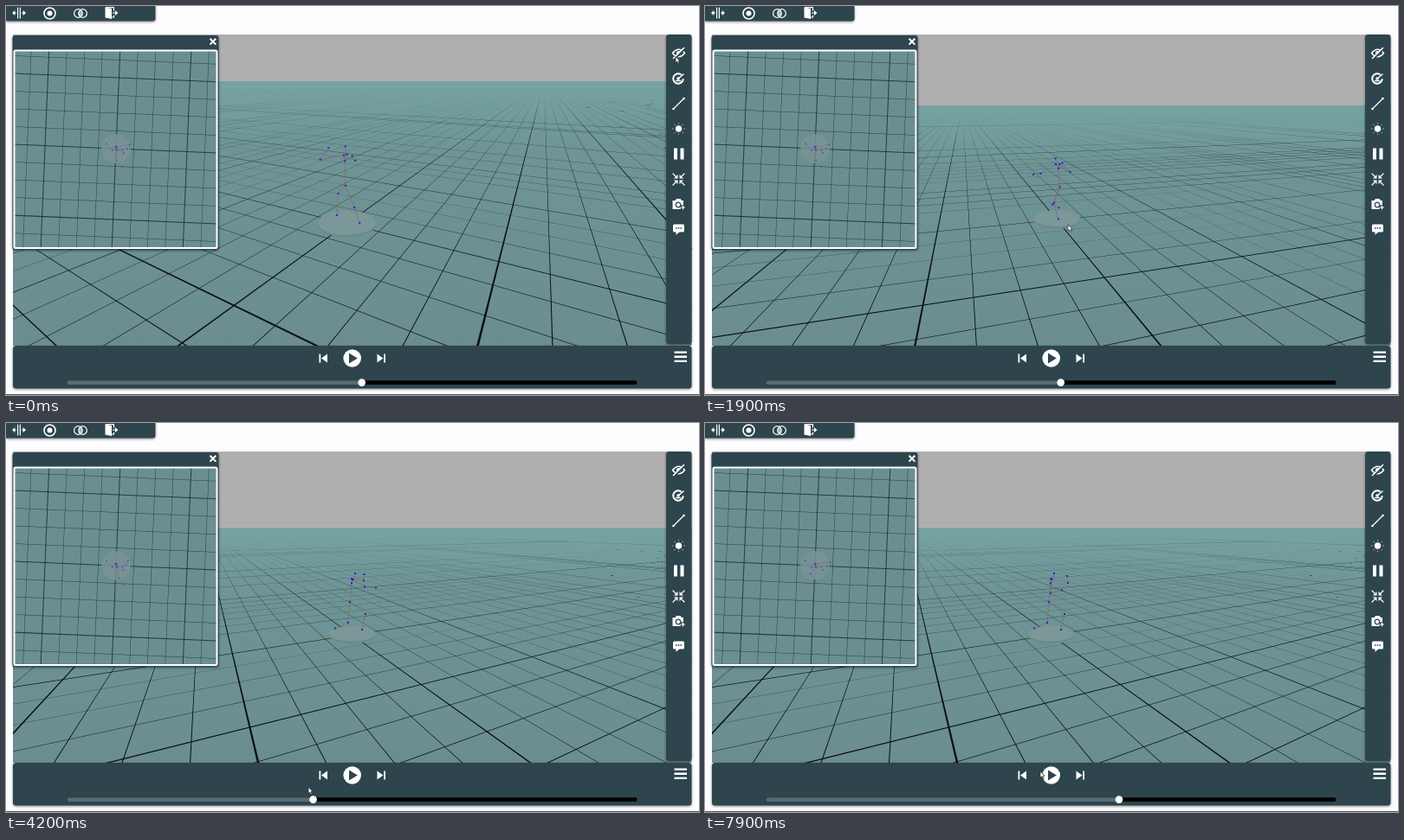
Animation, 800 px wide and 450 px high, one loop 8 s. Source, as an HTML page with a canvas:

```html
<!DOCTYPE html>
<html lang="en">
<head>
<meta charset="utf-8">
<title>Motion viewer</title>
<style>
  html, body { margin: 0; width: 100%; height: 100%; overflow: hidden; background: #fdfcfe; }
  canvas, svg { position: absolute; left: 0; top: 0; width: 800px; height: 450px; display: block; }
  .panel { fill: #2e454d; filter: drop-shadow(0 1px 1.5px rgba(0, 0, 0, .45)); }
  .line { fill: none; stroke: #fff; stroke-width: 1.6; stroke-linecap: round; stroke-linejoin: round; }
  .fine { stroke-width: 1.2; }
  .solid { fill: #fff; }
</style>
</head>
<body>
<canvas id="scene" width="800" height="450"></canvas>
<svg viewBox="0 0 800 450">
  <path class="panel" d="M0 0H172.500V14.500a3 3 0 0 1-3 3H0Z"/>
  <rect class="panel" x="762" y="33" width="29.500" height="358" rx="3.500"/>
  <rect class="panel" x="8" y="393" width="783.500" height="49.500" rx="3.500"/>
  <rect x="0" y="449" width="800" height="1" fill="#55555a"/>

  <!-- top toolbar -->
  <g transform="translate(15 8)">
    <path class="line fine" d="M-1.400-6V6M1.400-6V6M-3.500 0H-6M3.500 0H6"/>
    <path class="solid" d="M-8 0l3.300-3v6zM8 0l-3.300-3v6z"/>
  </g>
  <g transform="translate(50.500 8.500)"><circle class="line" r="6.500"/><circle class="solid" r="3"/></g>
  <g transform="translate(86 8.500)">
    <circle class="line fine" cx="-2.600" r="4.800"/>
    <circle class="line fine" cx="2.600" r="4.800"/>
    <path class="solid" d="M0-4a4.800 4.800 0 0 1 0 8a4.800 4.800 0 0 1 0-8" opacity=".6"/>
  </g>
  <g transform="translate(121 8)">
    <path class="solid" d="M-6.500-6.500L1-5V7L-6.500 5.500Z"/>
    <path class="line fine" d="M-5.500-6.300H3.500V-3M3.500 3V5H1M2.500 0H6"/>
    <path class="solid" d="M8.500 0L5-3v6z"/>
  </g>

  <!-- right toolbar -->
  <g transform="translate(776.500 54.500)">
    <path class="line" d="M-7 0Q0-8.500 7 0Q0 8.500-7 0Z"/>
    <circle class="solid" r="2.600"/>
    <path d="M-5 6.500L6.500-5" stroke="#2e454d" stroke-width="3"/>
    <path class="line" d="M-6 6L6-6"/>
  </g>
  <g transform="translate(776 84)">
    <path class="line" d="M3-5A5.800 5.800 0 1 0 5.700 1" style="stroke-width:2"/>
    <circle class="solid" r="1.800"/>
    <path class="line" d="M0 0L6-5M-2.500 2.500H2.500"/>
  </g>
  <g transform="translate(776.500 113)">
    <path class="line fine" d="M-6 6L6-6"/>
    <circle class="solid" cx="-6" cy="6" r="1.300"/><circle class="solid" cx="6" cy="-6" r="1.300"/>
  </g>
  <g transform="translate(776.500 142)">
    <circle class="solid" r="3.700"/>
    <path class="line" d="M-6.700 0h.2M6.500 0h.2M0-6.300v.2M0 6.100v.2M-4.600-4.600h.1M4.600-4.600h.1M-4.600 4.600h.1M4.600 4.600h.1" style="stroke-width:.9"/>
  </g>
  <path class="solid" d="M771 164.500h4v13h-4zM778.500 164.500h4v13h-4z"/>
  <g transform="translate(776.500 200.500)">
    <path class="line fine" d="M-6.500-6.500L-2-2M6.500-6.500L2-2M-6.500 6.500L-2 2M6.500 6.500L2 2"/>
    <path class="solid" d="M-1-1h-4.500l4.500-4.500zM1-1h4.500l-4.500-4.500zM-1 1h-4.500l4.500 4.500zM1 1h4.500l-4.500 4.500z"/>
  </g>
  <g transform="translate(776 229)">
    <path class="solid" d="M-6.500-4H-3.500L-2-6H2.500L4-4H6V6H-6.500Z"/>
    <circle cy="1" r="2.800" fill="none" stroke="#2e454d" stroke-width="1.300"/>
    <circle cx="5.500" cy="4" r="3" fill="#2e454d"/>
    <path class="line fine" d="M3.500 4h4M5.500 2v4"/>
  </g>
  <g transform="translate(776.500 258)">
    <path class="solid" d="M-5-5.500H5a1.500 1.500 0 0 1 1.500 1.500V2A1.500 1.500 0 0 1 5 3.500H1L-3 6.800V3.500H-5A1.500 1.500 0 0 1-6.500 2V-4A1.500 1.500 0 0 1-5-5.500Z"/>
    <path d="M-3.500-1h1.600M-.8-1h1.600M1.900-1h1.600" stroke="#2e454d" stroke-width="1.700"/>
  </g>

  <!-- player -->
  <path class="solid" d="M771.500 399.500h14.500v2.300h-14.500zM771.500 404.600h14.500v2.300h-14.500zM771.500 409.700h14.500v2.300h-14.500z"/>
  <path class="solid" d="M361.500 402.500h1.800v10h-1.800zM371 402.500v10l-7-5z"/>
  <path class="solid" d="M438 402.500h-1.800v10h1.800zM428.500 402.500v10l7-5z"/>
  <circle class="solid" cx="399.700" cy="407.500" r="10.300"/>
  <path d="M396 401.500v12l9.800-6z" fill="#2e454d"/>
  <rect x="70.500" y="433.300" width="658" height="4.600" rx="2" fill="#000"/>
  <rect id="played" x="70.500" y="433.300" width="340" height="4.600" rx="2" fill="#566d74"/>
  <circle id="knob" cy="435.600" r="4.300" class="solid"/>

  <path id="cursor" d="M0 0V7.200L1.700 5.700L3 8.300L4.200 7.700L3 5.200H5.200Z" fill="#fff" stroke="#222" stroke-width=".7"/>
</svg>
<script>
const LOOP = 8000, STEP = 100;
const CX = 400, CY = 237.5, FOCAL = 354, NEAR = 0.4, REACH = 90;
const VIEW = { x: 8, y: 33, w: 783.5, h: 360 };
const DISC = { radius: 0.82, top: 0.07 };
const HAZE = "118,162,162";

// time, turn, horizon, eye height, origin x, origin y
const CAMERA = [
  [350, -209.9, 87, 3.76, 393.5, 252],
  [1100, -92.4, 113, 3.2, 407, 250.5],
  [1900, -74.6, 115, 3.84, 406, 247.3],
  [2600, 24.9, 121.6, 3.62, 399.5, 245.3]
];
const POINTER = [
  [0, 773, 58.5], [200, 773, 58.5], [600, 725, 170], [1100, 677.5, 196], [1900, 419, 253],
  [2500, 395, 275], [3150, 415, 431.5], [3400, 415, 431.5], [5000, 283, 411],
  [5700, 228, 412], [6300, 395, 405], [6600, 395, 405], [7900, 387, 403]
];
const KNOB = [[3400, 410.7], [5000, 298.5], [5700, 231.5], [6450, 231.5], [7900, 478]];

// Joints as seen by the resting camera: x, y, distance behind the disc centre.
const BODY = {
  head: [403, 174, -.04], neck: [399, 185.5, .05], hip: [397, 207, .09],
  shoulderA: [400.5, 181, -.04], shoulderB: [399, 180, .09],
  kneeA: [415, 221, -.02], footA: [411, 239, .11],
  kneeB: [395, 231, -.17], footB: [380, 237.5, -.01]
};
// slider position, then elbow A, hand A, elbow B, hand B
const ARMS = [
  [231.5, 409, 194, -.5, 422, 189, -.64, 413, 182, .46, 413, 175, .24],
  [298.5, 418, 185, -.46, 430, 188, -.66, 410, 182, .46, 411, 175, .24],
  [410.7, 410, 193.5, -.5, 424, 193, -.66, 416, 183, .5, 416, 175, .24],
  [478, 399, 197, -.46, 412, 193, -.64, 419, 185, .5, 418, 177, .24]
];
const BONES = ["head neck", "neck hip", "neck shoulderA", "neck shoulderB",
  "shoulderA elbowA", "elbowA handA", "shoulderB elbowB", "elbowB handB",
  "hip kneeA", "kneeA footA", "hip kneeB", "kneeB footB"].map(b => b.split(" "));

const ctx = document.getElementById("scene").getContext("2d");
const played = document.getElementById("played");
const knob = document.getElementById("knob");
const cursor = document.getElementById("cursor");

const smooth = u => u * u * (3 - 2 * u);
const linear = u => u;

// Blend rows of [key, ...values] at the given key.
function sample(rows, key, ease = linear) {
  if (key <= rows[0][0]) return rows[0].slice(1);
  for (let i = 1; i < rows.length; i++) {
    const a = rows[i - 1], b = rows[i];
    if (key < b[0]) {
      const u = ease((key - a[0]) / (b[0] - a[0]));
      return a.slice(1).map((v, k) => v + (b[k + 1] - v) * u);
    }
  }
  return rows[rows.length - 1].slice(1);
}

function rotator(degrees) {
  const a = degrees * Math.PI / 180, c = Math.cos(a), s = Math.sin(a);
  return (x, z) => [x * c - z * s, x * s + z * c];
}

function perspective([turn, horizon, eye, ox, oy]) {
  const pitch = Math.atan((CY - horizon) / FOCAL);
  const cos = Math.cos(pitch), sin = Math.sin(pitch);
  const depth0 = FOCAL * eye / ((oy - horizon) * cos);
  const side0 = (ox - CX) / FOCAL * depth0;
  const ahead0 = (depth0 - eye * sin) / cos;
  const rotate = rotator(turn), unrotate = rotator(-turn);
  const depth = (x, y, z) => (rotate(x, z)[1] + ahead0) * cos + (eye - y) * sin;
  const project = (x, y, z) => {
    const [r, g] = rotate(x, z);
    const ahead = g + ahead0, d = ahead * cos + (eye - y) * sin;
    return [CX + FOCAL * (r + side0) / d, CY + FOCAL * ((eye - y) * cos - ahead * sin) / d];
  };
  // Screen point at a known forward distance, back to the world.
  const lift = (sx, sy, forward) => {
    const k = (sy - CY) / FOCAL, ahead = forward + ahead0;
    const below = ahead * (sin + k * cos) / (cos - k * sin);
    const right = (sx - CX) / FOCAL * (ahead * cos + below * sin) - side0;
    const [x, z] = unrotate(right, forward);
    return [x, eye - below, z];
  };
  return { depth, project, lift };
}

function overhead() {
  const rotate = rotator(-2.4), scale = 20.5, height = 14;
  const project = (x, y, z) => {
    const [r, g] = rotate(x, z), k = scale * height / (height - y);
    return [127 + r * k, 165 - g * k];
  };
  return { depth: () => 1, project };
}

const resting = perspective(CAMERA[CAMERA.length - 1].slice(1));
const above = overhead();

function polygon(points) {
  points.forEach(([x, y], i) => i ? ctx.lineTo(x, y) : ctx.moveTo(x, y));
  ctx.closePath();
}

// One grid line as a thin quad on the floor, cut at the near plane.
function gridLine(cam, i, along, half, reach) {
  const at = (s, off) => along ? [i + off, 0, s] : [s, 0, i + off];
  let from = -reach, to = reach;
  const d1 = cam.depth(...at(from, 0)), d2 = cam.depth(...at(to, 0));
  if (d1 < NEAR && d2 < NEAR) return;
  const cut = from + (to - from) * (NEAR - d1) / (d2 - d1);
  if (d1 < NEAR) from = cut;
  if (d2 < NEAR) to = cut;
  polygon([[from, -half], [to, -half], [to, half], [from, half]].map(q => cam.project(...at(...q))));
}

function grid(cam, reach, thin, bold, color) {
  ctx.fillStyle = color;
  for (const along of [true, false]) {
    ctx.beginPath();
    for (let i = -reach; i <= reach; i++) gridLine(cam, i, along, (i % 4 ? thin : bold) / 2, reach);
    ctx.fill();
  }
}

function disc(cam, y, fill) {
  ctx.beginPath();
  polygon(Array.from({ length: 48 }, (_, i) => {
    const a = i * Math.PI / 24;
    return cam.project(DISC.radius * Math.cos(a), y, DISC.radius * Math.sin(a));
  }));
  ctx.fillStyle = fill;
  ctx.fill();
}

function figure(cam, joints, dot, alpha) {
  const at = {};
  for (const name in joints) at[name] = cam.project(...joints[name]);
  ctx.globalAlpha = alpha;
  ctx.strokeStyle = "#8e5f6c";
  ctx.lineWidth = 0.7;
  ctx.beginPath();
  for (const [a, b] of BONES) {
    ctx.moveTo(...at[a]);
    ctx.lineTo(...at[b]);
  }
  ctx.stroke();
  ctx.fillStyle = "#1d16e0";
  for (const [x, y] of Object.values(at)) ctx.fillRect(x - dot / 2, y - dot / 2, dot, dot);
  ctx.globalAlpha = 1;
}

function pose(position) {
  const arms = sample(ARMS, position), joints = {};
  for (const name in BODY) joints[name] = resting.lift(...BODY[name]);
  ["elbowA", "handA", "elbowB", "handB"].forEach((name, i) => {
    joints[name] = resting.lift(...arms.slice(i * 3, i * 3 + 3));
  });
  return joints;
}

function clipped(x, y, w, h, draw) {
  ctx.save();
  ctx.beginPath();
  ctx.rect(x, y, w, h);
  ctx.clip();
  draw();
  ctx.restore();
}

function fillDown(top, bottom, stops) {
  const g = ctx.createLinearGradient(0, top, 0, bottom);
  stops.forEach(stop => g.addColorStop(...stop));
  ctx.fillStyle = g;
  ctx.fillRect(VIEW.x, top, VIEW.w, bottom - top);
}

function mainView(view, joints) {
  const horizon = view[1], cam = perspective(view);
  clipped(VIEW.x, VIEW.y, VIEW.w, VIEW.h, () => {
    ctx.fillStyle = "#b1aeb0";
    ctx.fillRect(VIEW.x, VIEW.y, VIEW.w, VIEW.h);
    fillDown(horizon, 393, [[0, `rgb(${HAZE})`], [0.25, "#6f9596"], [1, "#6b8d90"]]);
    grid(cam, REACH, 0.0145, 0.033, "#0b1213");
    fillDown(horizon, horizon + 45, [[0, `rgba(${HAZE},.95)`], [0.3, `rgba(${HAZE},.5)`], [1, `rgba(${HAZE},0)`]]);
    disc(cam, 0, "#6d898b");
    disc(cam, DISC.top, "#7b9798");
    figure(cam, joints, 2, 0.9);
  });
}

function insetView(joints) {
  ctx.save();
  ctx.shadowColor = "rgba(0,0,0,.5)";
  ctx.shadowBlur = 3;
  ctx.shadowOffsetY = 1;
  ctx.fillStyle = "#2e454d";
  ctx.beginPath();
  ctx.roundRect(7.5, 34, 238, 248, 3);
  ctx.fill();
  ctx.restore();
  clipped(9, 51, 235, 229.5, () => {
    ctx.fillStyle = "#6b8f91";
    ctx.fillRect(9, 51, 235, 230);
    grid(above, 12, 0.024, 0.05, "rgba(20,32,34,.75)");
    disc(above, 0, "rgba(120,147,148,.85)");
    figure(above, joints, 1.5, 0.55);
  });
  ctx.strokeStyle = "#fff";
  ctx.lineWidth = 2;
  ctx.beginPath();
  ctx.roundRect(9.5, 51.5, 234, 228.5, 1.5);
  ctx.stroke();
  ctx.beginPath();
  ctx.moveTo(235.5, 37.8);
  ctx.lineTo(242.3, 44.6);
  ctx.moveTo(242.3, 37.8);
  ctx.lineTo(235.5, 44.6);
  ctx.stroke();
}

function render(t) {
  const [position] = sample(KNOB, t);
  const [px, py] = sample(POINTER, t, smooth);
  const joints = pose(position);
  ctx.clearRect(0, 0, 800, 450);
  mainView(sample(CAMERA, t, smooth), joints);
  insetView(joints);
  played.setAttribute("width", position - 70.5);
  knob.setAttribute("cx", position);
  cursor.setAttribute("transform", `translate(${px} ${py})`);
}

const start = performance.now();
function tick() {
  const t = (performance.now() - start) % LOOP;
  render(Math.floor(t / STEP) * STEP);
  requestAnimationFrame(tick);
}
tick();
</script>
</body>
</html>
```
